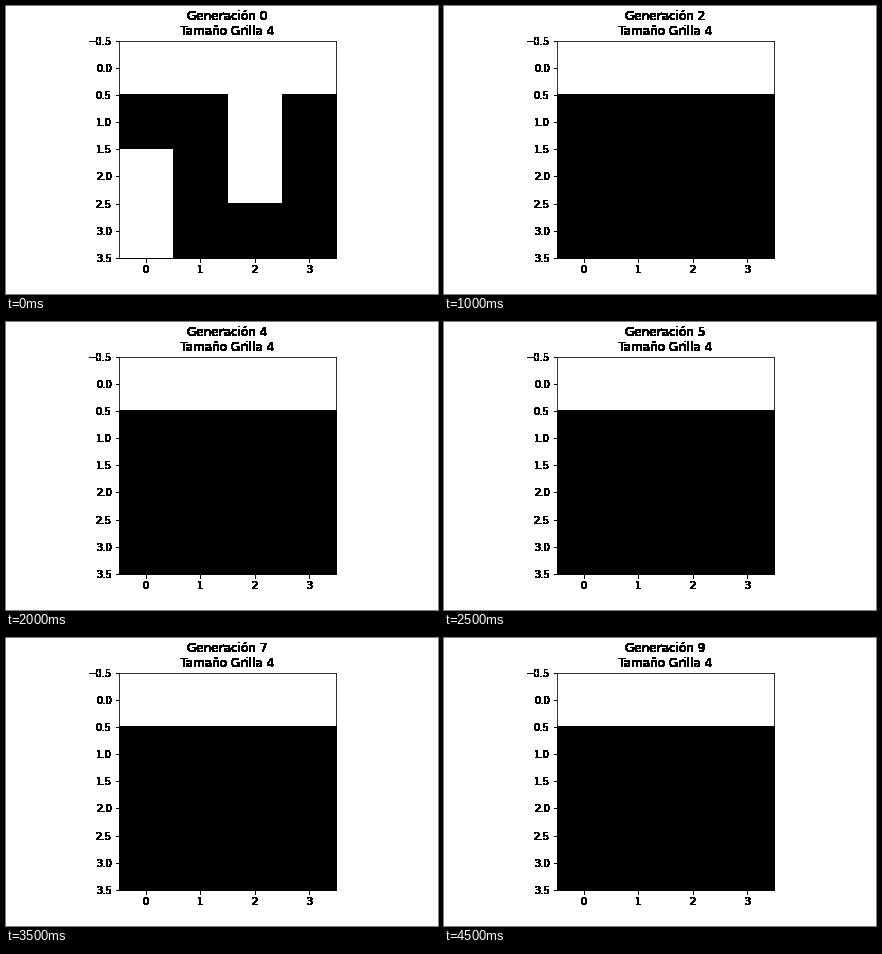
Animation, 432 px wide and 288 px high, one loop 5 s. Source, as a matplotlib script:

```python
import numpy as np
import matplotlib.pyplot as plt
from matplotlib.animation import FuncAnimation

SIZE = 4
FRAMES = 10
START = ["....", "##.#", ".#.#", ".###"]


def neighbour_sum(cells):
    """Sum of the four direct neighbours, with nothing past the border."""
    p = np.pad(cells, 1)
    return p[:-2, 1:-1] + p[2:, 1:-1] + p[1:-1, :-2] + p[1:-1, 2:]


def grow(cells):
    """An empty cell fills when most of its neighbours are filled."""
    majority = 2 * neighbour_sum(cells) > neighbour_sum(np.ones_like(cells))
    return np.where(majority, 1, cells)


def hard_edges(img, dpi):
    """Make every touched pixel opaque, which gives crisp, heavy text."""
    out = np.round(img * 255).astype(np.uint8)
    out[..., 3] = np.where(out[..., 3] > 0, 255, 0)
    return out, 0, 0


generations = [np.array([[int(c == "#") for c in row] for row in START])]
while len(generations) < FRAMES:
    generations.append(grow(generations[-1]))

plt.rcParams.update({"font.family": "DejaVu Sans", "font.size": 10})
fig, ax = plt.subplots(figsize=(6, 4), dpi=72, facecolor="white")
fig.subplots_adjust(left=0.125, right=0.9, bottom=0.125, top=0.88)
grid = ax.imshow(generations[0], cmap="binary", vmin=0, vmax=1)
ax.set_agg_filter(hard_edges)


def update(i):
    grid.set_data(generations[i])
    title = ax.set_title(f"Generación {i}\nTamaño Grilla {SIZE}")
    return grid, title


anim = FuncAnimation(fig, update, frames=FRAMES, interval=500,
                     repeat=True, repeat_delay=0, blit=False)
plt.show()
```
